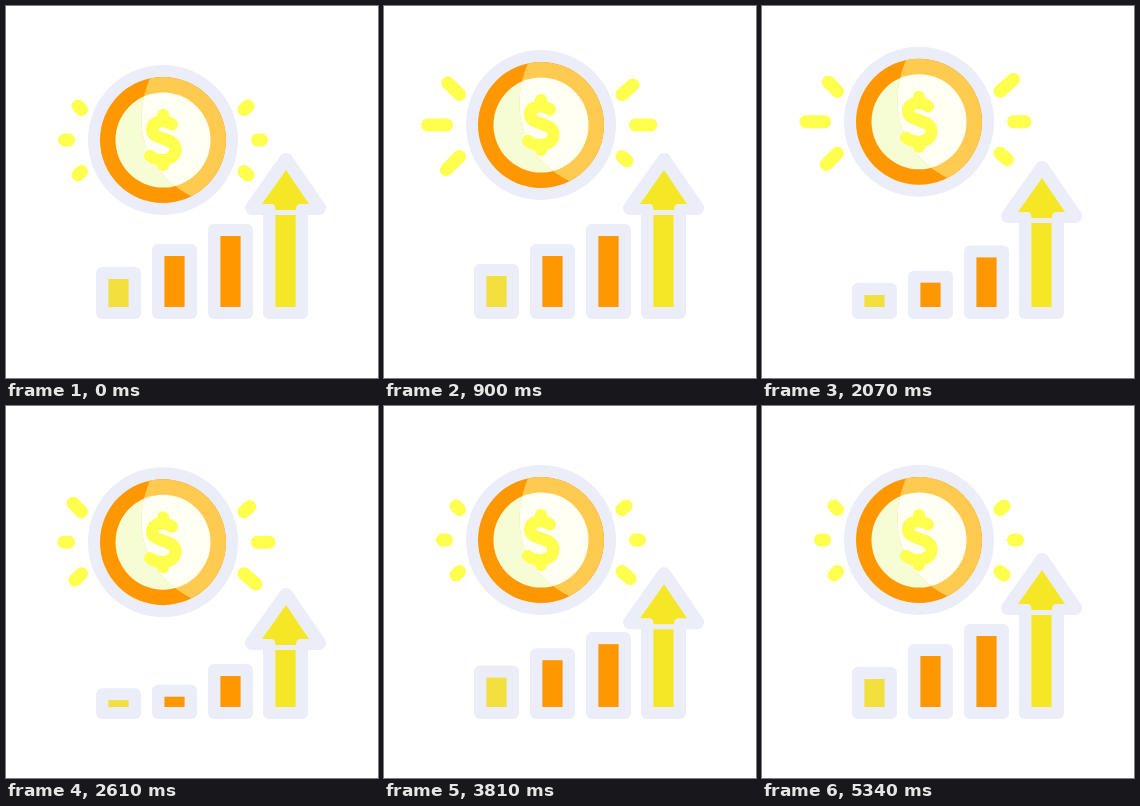
Write an HTML page that moves like this. It is 372 px wide and 372 px high and loops after 5400 ms.

```html
<!DOCTYPE html>
<html lang="en">
<head>
<meta charset="utf-8">
<title>Growth</title>
<style>
html, body { margin: 0; width: 100%; height: 100%; overflow: hidden; background: #fff; }
svg { display: block; width: 100%; height: 100%; }
.case { fill: #ebeef8; }
.ray, .dollar { fill: none; stroke: #ffff4d; stroke-linecap: round; stroke-linejoin: round; }
.ray { stroke-width: 13; }
.dollar { stroke-width: 12; }
</style>
</head>
<body>
<svg viewBox="0 0 372 372">
  <defs><clipPath id="face"><circle cx="157" cy="134" r="63"/></clipPath></defs>
  <g id="bars"></g>
  <g id="head">
    <path class="case" d="M280 154L313 202H246Z" stroke="#ebeef8" stroke-width="14" stroke-linejoin="round"/>
    <path fill="#f5e726" d="M280 164L303 198H294Q290 198 290 204H269.5Q269.5 198 265.5 198H256Z"/>
  </g>
  <g id="coin">
    <circle class="case" cx="157" cy="134" r="75"/>
    <circle cx="157" cy="134" r="63" fill="#ff9800"/>
    <circle cx="157" cy="134" r="47.5" fill="#f6fcd4"/>
    <g clip-path="url(#face)">
      <clipPath id="shine"><path d="M145 70C126 112 133 164 187 191H240V60Z"/></clipPath>
      <g clip-path="url(#shine)">
        <circle cx="157" cy="134" r="63" fill="#ffca50"/>
        <circle cx="157" cy="134" r="47.5" fill="#fffff3"/>
      </g>
    </g>
    <path class="dollar" d="M157 109V115M166 118.500C160 114 146 113 146 124C146 134 169.500 131 169.500 143C169.500 156 151 156 144 150M157 154V159"/>
    <g id="rays"></g>
  </g>
</svg>
<script>
const LOOP = 5400, STEP = 30, PULSE = 1080, PULSES = 3, REACH = 15, BASE = 313, RIM = 12;
const NS = 'http://www.w3.org/2000/svg';
const $ = id => document.getElementById(id);

function add(parent, tag, attrs) {
  const node = document.createElementNS(NS, tag);
  for (const key in attrs) node.setAttribute(key, attrs[key]);
  return parent.appendChild(node);
}

const wave = p => (1 - Math.cos(Math.PI * p)) / 2;

// Eases in and out between [time, value] steps.
function track(steps, t) {
  if (t <= steps[0][0]) return steps[0][1];
  for (let i = 1; i < steps.length; i++) {
    const [t0, a] = steps[i - 1], [t1, b] = steps[i];
    if (t < t1) return a + (b - a) * wave((t - t0) / (t1 - t0));
  }
  return steps[steps.length - 1][1];
}

const coinSteps = [[210, 0], [1590, -30], [2790, 4], [3600, 0]];

const bars = [
  { x: 90, top: 261, color: '#f2e03f', steps: [[480, 0], [1320, -6], [2400, 22], [4250, -5], [5000, 0]] },
  { x: 146, top: 238, color: '#ff9800', steps: [[880, 0], [1320, -5.5], [2520, 41], [4350, -5], [5000, 0]] },
  { x: 202, top: 218, color: '#ff9800', steps: [[900, 0], [1400, -5.5], [2600, 40], [4500, -5], [5200, 0]] },
  { x: 257, top: 190, color: '#f5e726', steps: [[1000, 0], [1620, -5], [2850, 39], [4680, -7], [5340, 0]] }
];
for (const bar of bars) {
  bar.outer = add($('bars'), 'rect', { class: 'case', x: bar.x, width: 45, rx: 6 });
  bar.inner = add($('bars'), 'rect', { fill: bar.color, x: bar.x + 12.4, width: 20.2 });
}
const arrow = bars[3];

// Inner end, resting outer end, start of the first pulse.
const rays = [
  { from: [62.5, 134], to: [58.5, 134], start: 390 },
  { from: [251.500, 134], to: [255.500, 134], start: 180 },
  { from: [75.5, 103.5], to: [72, 100], start: 190 },
  { from: [75.5, 165.5], to: [72, 169], start: 260 },
  { from: [238, 103.5], to: [242, 100], start: 590 },
  { from: [238, 165.5], to: [242, 169], start: 790 }
];
for (const ray of rays) {
  const dx = ray.to[0] - ray.from[0], dy = ray.to[1] - ray.from[1], len = Math.hypot(dx, dy);
  ray.dir = [dx / len, dy / len];
  ray.line = add($('rays'), 'line', { class: 'ray', x1: ray.from[0], y1: ray.from[1] });
}

function setSpan(rect, top, bottom) {
  rect.setAttribute('y', top);
  rect.setAttribute('height', Math.max(0, bottom - top));
}

function draw(t) {
  $('coin').setAttribute('transform', `translate(0 ${track(coinSteps, t)})`);
  for (const bar of bars) {
    const top = bar.top + track(bar.steps, t);
    setSpan(bar.outer, top, BASE);
    setSpan(bar.inner, top + RIM, BASE - RIM);
  }
  $('head').setAttribute('transform', `translate(0 ${track(arrow.steps, t)})`);
  for (const { start, to, dir, line } of rays) {
    const phase = Math.min(PULSES, Math.max(0, (t - start) / PULSE));
    const reach = REACH * wave(2 * phase);
    line.setAttribute('x2', to[0] + dir[0] * reach);
    line.setAttribute('y2', to[1] + dir[1] * reach);
  }
}

const begin = performance.now();
function tick() {
  const t = (performance.now() - begin) % LOOP;
  draw(Math.floor(t / STEP) * STEP);
  requestAnimationFrame(tick);
}
tick();
</script>
</body>
</html>
```
